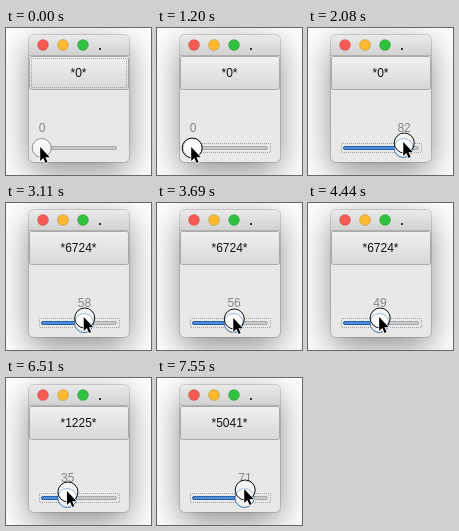
These frames come from a looping animation (145 px wide and 147 px high, 8 s). An HTML page with a canvas:

```html
<!DOCTYPE html>
<html lang="en">
<head>
<meta charset="utf-8">
<title>Slider</title>
<style>
html, body { margin: 0; width: 100%; height: 100%; overflow: hidden; background: #fff; }
canvas { display: block; }
</style>
</head>
<body>
<canvas id="stage" width="145" height="147"></canvas>
<script>
const ctx = document.getElementById('stage').getContext('2d');
const LOOP = 8000, START = 1200, STEP = 147.7, EARLY = 22, DEBOUNCE = 290;

// Each drag eases the slider to a value and the pointer to a height.
const drags = [
  { from: 1200, to: 2080, value: 82, y: 115 },
  { from: 2830, to: 3400, value: 35, y: 115 },
  { from: 3400, to: 3940, value: 70, y: 116 },
  { from: 3940, to: 4440, value: 49, y: 115 },
  { from: 4900, to: 5330, value: 81, y: 112 },
  { from: 5780, to: 6210, value: 35, y: 114 },
  { from: 6962, to: 7250, value: 71, y: 112 }
];
const presses = [[1200, 2520], [2970, 4590], [5030, 5330], [5920, LOOP]];
const arrow = new Path2D('M0 0V14L3.1 11L5.4 16L7.4 15.1L5.2 10.2H9.6Z');

const smooth = p => p * p * (3 - 2 * p);

// The screen refreshes in even steps.
const snap = t => START + Math.floor((t - START + EARLY) / STEP) * STEP;

function stateAt(t) {
  let value = 0, y = 120, shown = 0;
  drags.forEach((drag, i) => {
    if (t < drag.from) return;
    const p = smooth(Math.min(1, (t - drag.from) / (drag.to - drag.from)));
    value += (drag.value - value) * p;
    y += (drag.y - y) * p;
    const settled = drag.to + DEBOUNCE;
    const next = drags[i + 1];
    if (t >= settled && (!next || next.from > settled)) shown = drag.value;
  });
  return {
    value: Math.round(value), y: Math.round(y), shown,
    focused: t >= START,
    pressed: presses.some(([from, to]) => t >= from && t < to)
  };
}

function vertical(y0, y1, top, bottom) {
  const g = ctx.createLinearGradient(0, y0, 0, y1);
  g.addColorStop(0, top);
  g.addColorStop(1, bottom);
  return g;
}

function box(x, y, w, h, r, fill, stroke) {
  ctx.beginPath();
  ctx.roundRect(x, y, w, h, r);
  if (fill) { ctx.fillStyle = fill; ctx.fill(); }
  if (stroke) { ctx.strokeStyle = stroke; ctx.stroke(); }
}

function disc(x, y, r, fill, stroke) {
  box(x - r, y - r, 2 * r, 2 * r, r, fill, stroke);
}

function dotted(x, y, w, h) {
  ctx.setLineDash([1, 1]);
  ctx.lineDashOffset = 0.5;
  box(x, y, w, h, 0, null, '#a0a0a0');
  ctx.setLineDash([]);
}

function label(text, x, y, colour) {
  ctx.fillStyle = colour;
  ctx.fillText(text, x, y);
}

function drawWindow() {
  ctx.save();
  ctx.shadowColor = 'rgba(0,0,0,.45)';
  ctx.shadowBlur = 34;
  ctx.shadowOffsetY = 10;
  box(23, 7, 100, 127, 5, '#e8e8e7');
  ctx.restore();
  box(22.5, 6.5, 101, 128, 5, null, 'rgba(0,0,0,.14)');
  box(23, 7, 100, 20, [5, 5, 0, 0], vertical(7, 27, '#eaeaea', '#d2d2d2'));
  box(23, 27, 100, 1, 0, '#b2b2b2');
  ['#fb5a54', '#fdb92f', '#30c23f'].forEach((c, i) =>
    disc(37 + 20 * i, 17, 5.5, c, 'rgba(0,0,0,.14)'));
  box(93, 20, 2, 2, 0, '#333');
}

function drawButton(s) {
  box(23.5, 28.5, 99, 33, 2, vertical(28, 61, '#f1f1f1', '#d8d8d8'), '#a9a9a9');
  if (!s.focused) dotted(25.5, 30.5, 95, 29);
  label(`*${s.shown ** 2}*`, 72.5, 49, '#111');
}

function drawSlider(s, x) {
  if (s.focused) dotted(33.5, 115.5, 80, 9);
  box(35.5, 118.5, 75, 3, 1.5, '#c9c9c9', '#a8a8a8');
  if (s.value) box(35.5, 118.5, x - 35.5, 3, 1.5, '#4a90dc', '#2b5f9e');
  disc(x, 120, 9.5, vertical(110, 130, '#fff', '#ececec'), s.value ? '#416da3' : '#8e8e8e');
  label(s.value, x + 0.5, 104, '#85858b');
}

function drawPointer(s, x) {
  if (s.pressed) disc(x, s.y, 10, 'rgba(255,255,255,.5)', '#111');
  ctx.save();
  ctx.translate(x - 1, s.y - 1);
  ctx.lineJoin = 'round';
  ctx.lineWidth = 1.6;
  ctx.strokeStyle = '#fff';
  ctx.stroke(arrow);
  ctx.fillStyle = '#000';
  ctx.fill(arrow);
  ctx.restore();
}

function frame(now) {
  const s = stateAt(snap(now % LOOP));
  const x = 35.7 + 0.73 * s.value;
  ctx.fillStyle = '#fff';
  ctx.fillRect(0, 0, 145, 147);
  ctx.font = '12px "Liberation Sans", Arial, sans-serif';
  ctx.textAlign = 'center';
  ctx.lineWidth = 1;
  drawWindow();
  drawButton(s);
  drawSlider(s, x);
  drawPointer(s, x + (s.value ? 0.7 : -0.5));
  requestAnimationFrame(frame);
}
requestAnimationFrame(frame);
</script>
</body>
</html>
```
